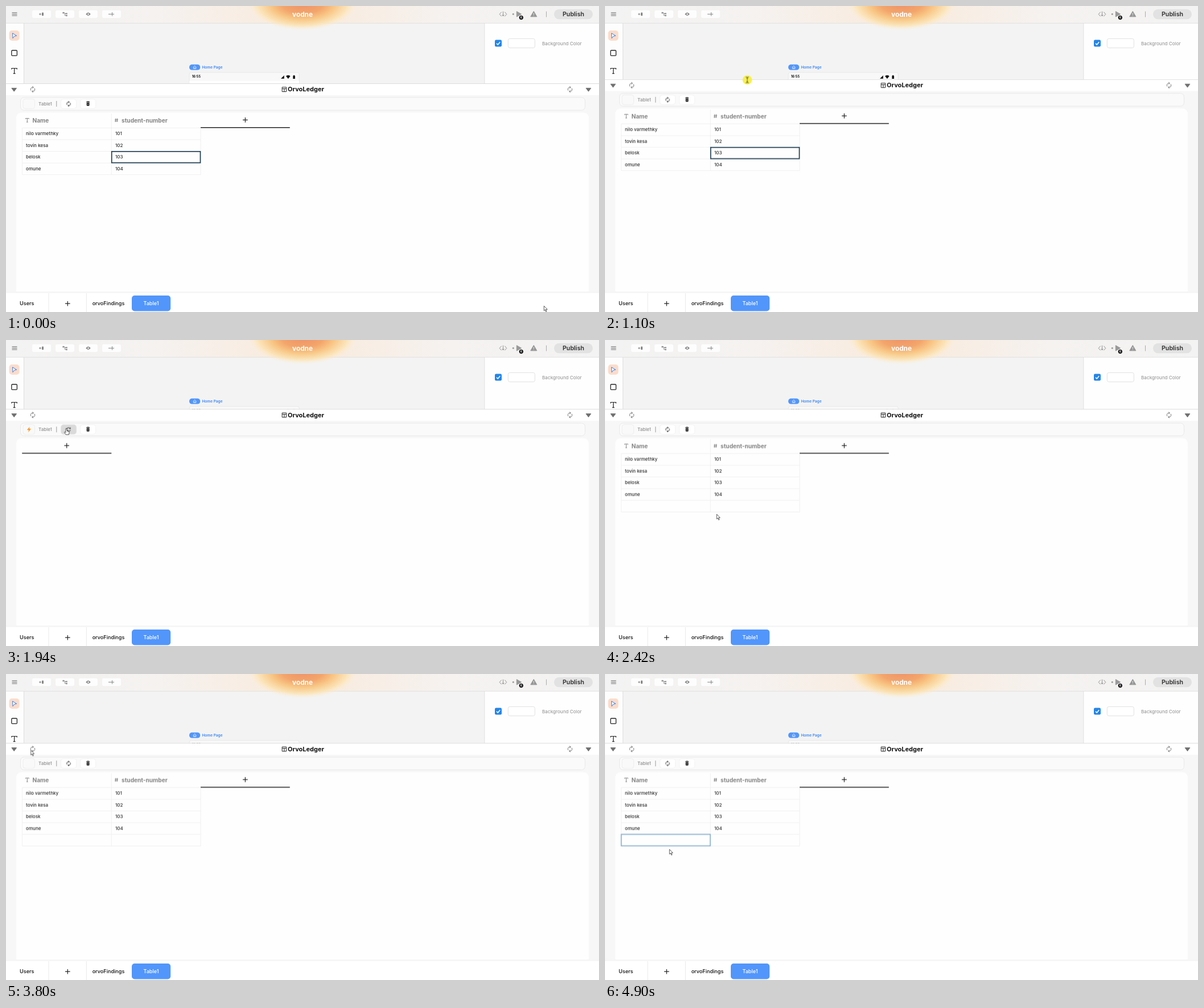
An HTML page for the animation above (4970 ms loop, 1042 px wide and 538 px high).

```html
<!DOCTYPE html>
<html lang="en">
<head>
<meta charset="utf-8">
<title>Sheet reload</title>
<style>
html, body { margin: 0; width: 100%; height: 100%; overflow: hidden; background: #f7f7f7; }
svg { display: block; width: 100%; height: 100%; }
text { font-family: Inter, "Open Sans", sans-serif; font-size: 8.1px; font-weight: 500; fill: #2e2e2e; }
.mid { text-anchor: middle; }
.bold { font-weight: 700; }
.grey { fill: #8d8d8d; }
.head { font-size: 10.1px; font-weight: 700; fill: #858585; }
.tab { font-size: 9.1px; fill: #111; }
.line { fill: none; stroke-width: 1; stroke-linecap: round; stroke-linejoin: round; }
.rule { fill: none; stroke: #ececec; stroke-width: .8; }

/* every track shares one 4970 ms loop */
.anim { animation: 4970ms step-end infinite; }
.panel { animation-name: lift; }
.data { animation-name: data; }
.empty { animation-name: empty; }
.pick { animation-name: pick; }
.extra { animation-name: extra; }
.hotnum { animation-name: hotnum; }
.hotname { animation-name: hotname; }
.cell { animation-name: cell; }
.press { animation-name: press; }
.spin { animation-name: spin; animation-timing-function: linear; }
.cursor { animation-name: move; animation-timing-function: linear; }
.arrow { animation-name: arrow; }
.resize { animation-name: resize; }
.hand { animation-name: hand; }
.ring { animation-name: ring; }

@keyframes lift {
  0% { transform: translateY(0); }
  22.1% { transform: translateY(-7.2px); }
  23.5%, 100% { transform: translateY(-14.7px); }
}
@keyframes data {
  0% { opacity: 1; } 37.6% { opacity: 0; } 48.6% { opacity: 1; }
  83% { opacity: 0; } 87.2%, 100% { opacity: 1; }
}
@keyframes empty {
  0% { opacity: 0; } 37.6% { opacity: 1; } 48.6% { opacity: 0; }
  83% { opacity: 1; } 87.2%, 100% { opacity: 0; }
}
@keyframes pick { 0% { opacity: 1; } 37.6%, 100% { opacity: 0; } }
@keyframes extra { 0% { opacity: 0; } 48.6%, 100% { opacity: 1; } }
@keyframes hotnum { 0% { opacity: 0; } 12.2% { opacity: 1; } 13.6%, 100% { opacity: 0; } }
@keyframes hotname { 0% { opacity: 0; } 30.5% { opacity: 1; } 34.7%, 100% { opacity: 0; } }
@keyframes cell {
  0% { opacity: 0; }
  8% { opacity: 1; transform: translate(28.6px, 276.1px); }
  9.4% { opacity: 1; transform: translate(28.6px, 235px); }
  10.8% { opacity: 0; }
  63.5% { opacity: 1; transform: translate(185.3px, 296.6px); }
  65.1% { opacity: 1; transform: translate(28.6px, 276.1px); }
  67.9% { opacity: 1; transform: translate(28.6px, 235px); }
  69.3% { opacity: 0; }
  88.6% { opacity: 1; transform: translate(28.6px, 235px); }
  90% { opacity: 1; transform: translate(28.6px, 255.5px); }
  91.4% { opacity: 1; transform: translate(28.6px, 276.1px); }
  92.8%, 100% { opacity: 1; transform: translate(28.6px, 296.6px); }
}
@keyframes press {
  0% { opacity: 0; } 36.2% { opacity: 1; } 41.8% { opacity: 0; }
  81.6% { opacity: 1; } 85.8%, 100% { opacity: 0; }
}
@keyframes spin {
  0%, 37.6% { transform: rotate(0deg); }
  48.6%, 83% { transform: rotate(360deg); }
  87.2%, 100% { transform: rotate(540deg); }
}
@keyframes move {
  0%, 1.3% { transform: translate(945px, 527px); }
  4% { transform: translate(700px, 480px); }
  6.6% { transform: translate(330px, 380px); }
  8% { transform: translate(185px, 305px); }
  9.4% { transform: translate(165px, 255px); }
  10.9% { transform: translate(190px, 204px); }
  12.2%, 13.4% { transform: translate(219.5px, 185px); }
  13.7% { transform: translate(232px, 166px); }
  15.1% { transform: translate(240px, 150px); }
  16.5% { transform: translate(246px, 142px); }
  18% { transform: translate(249px, 139px); }
  20.7% { transform: translate(250px, 137px); }
  22.1%, 26.2% { transform: translate(250px, 130px); }
  27.8% { transform: translate(222px, 148px); }
  29.2% { transform: translate(190px, 163px); }
  30.6% { transform: translate(165px, 175px); }
  32% { transform: translate(150px, 178px); }
  33.4% { transform: translate(135px, 173px); }
  34.8% { transform: translate(118px, 163px); }
  36.2%, 40.4% { transform: translate(106px, 155px); }
  41.8% { transform: translate(115px, 180px); }
  44.3% { transform: translate(160px, 260px); }
  47.2% { transform: translate(196px, 305px); }
  48.6%, 59.2% { transform: translate(196px, 306px); }
  59.4%, 60.6% { transform: translate(197px, 306px); }
  60.8%, 62.2% { transform: translate(196px, 306px); }
  63.6% { transform: translate(188px, 300px); }
  65.2% { transform: translate(150px, 275px); }
  66.6%, 67.8% { transform: translate(91px, 236px); }
  69.4% { transform: translate(50px, 180px); }
  70.8% { transform: translate(25px, 145px); }
  72.2% { transform: translate(10px, 131px); }
  73.6% { transform: translate(6px, 130px); }
  75% { transform: translate(26px, 130px); }
  77.9% { transform: translate(60px, 137px); }
  80.5% { transform: translate(100px, 152px); }
  81.7%, 84.5% { transform: translate(106.5px, 157.5px); }
  85.9% { transform: translate(110px, 175px); }
  87.3% { transform: translate(114px, 205px); }
  90.1% { transform: translate(118px, 260px); }
  93%, 95.6% { transform: translate(120px, 283px); }
  97.2% { transform: translate(117px, 297px); }
  98.5%, 100% { transform: translate(113px, 308px); }
}
@keyframes arrow {
  0% { opacity: 1; } 16.5% { opacity: 0; } 26.3% { opacity: 1; } 36.2% { opacity: 0; }
  41.8% { opacity: 1; } 81.6% { opacity: 0; } 85.8%, 100% { opacity: 1; }
}
@keyframes resize { 0% { opacity: 0; } 16.5% { opacity: 1; } 26.3%, 100% { opacity: 0; } }
@keyframes hand {
  0% { opacity: 0; } 36.2% { opacity: 1; } 41.8% { opacity: 0; }
  81.6% { opacity: 1; } 85.8%, 100% { opacity: 0; }
}
@keyframes ring { 0% { opacity: 0; } 19.3% { opacity: 1; } 26.3%, 100% { opacity: 0; } }
</style>
</head>
<body>
<svg viewBox="0 0 1042 538" preserveAspectRatio="none">
  <defs>
    <radialGradient id="sun">
      <stop offset="0" stop-color="#ee9069"/>
      <stop offset=".38" stop-color="#f3a56b"/>
      <stop offset=".6" stop-color="#f8c887"/>
      <stop offset=".82" stop-color="#fbe3b4" stop-opacity=".9"/>
      <stop offset="1" stop-color="#fcefd4" stop-opacity="0"/>
    </radialGradient>
    <linearGradient id="bar">
      <stop offset="0" stop-color="#f3f3f3"/>
      <stop offset=".25" stop-color="#f5f2f0"/>
      <stop offset=".5" stop-color="#faeadb"/>
      <stop offset=".75" stop-color="#f5f2f0"/>
      <stop offset="1" stop-color="#f3f3f3"/>
    </linearGradient>
    <g id="sync" class="line">
      <path d="M-3.4 1.6A3.8 3.8 0 0 1 1-3.7M3.4-1.6A3.8 3.8 0 0 1-1 3.7"/>
      <path d="M-.4-5.2L1.3-3.6L-.4-2M.4 5.2L-1.3 3.6L.4 2"/>
    </g>
    <path id="plus" d="M-4.3 0H4.3M0-4.3V4.3" fill="none" stroke="#222" stroke-width="1.2"/>
    <path id="drop" d="M-4.3-2.6H4.3L0 3.2Z" fill="#707070" stroke="#707070" stroke-linejoin="round"/>
    <path id="menu" d="M-4.5-2.6H4.5M-4.5 0H4.5M-4.5 2.6H4.5" fill="none" stroke-width="1.2"/>
    <path id="tee" d="M-3-2V-3.2H3V-2M0-3.2V3.3M-1.4 3.3H1.4" fill="none"/>
    <path id="hash" d="M-1-3.3L-1.8 3.3M1.8-3.3L1 3.3M-2.8-1.2H3M-3 1.2H2.8" fill="none"/>
  </defs>

  <!-- editor behind the sheet -->
  <rect x="31" y="30" width="810" height="120" fill="#f3f3f3"/>
  <rect y="30" width="31" height="120" fill="#fdfdfd"/>
  <rect x="841" y="30" width="201" height="120" fill="#fefefe"/>
  <path d="M31.5 30V150M840.8 30V150" stroke="#dfdfdf" fill="none"/>
  <rect width="1042" height="30" fill="url(#bar)"/>
  <path d="M0 30.3H1042" stroke="#dedede" stroke-width=".8"/>
  <ellipse cx="521" cy="-5" rx="96" ry="48" fill="url(#sun)"/>
  <text class="mid bold" x="521" y="19" style="font-size:11.8px;fill:#fff">vodne</text>

  <use href="#menu" x="15" y="14.3" stroke="#858585"/>
  <g fill="#fdfdfd">
    <rect x="46" y="7.5" width="33" height="13.5" rx="3"/>
    <rect x="87" y="7.5" width="33" height="13.5" rx="3"/>
    <rect x="128" y="7.5" width="33" height="13.5" rx="3"/>
    <rect x="169" y="7.5" width="33" height="13.5" rx="3"/>
  </g>
  <g fill="#858585" stroke="#858585">
    <path d="M58 14.3H62M60 12.3V16.3" fill="none"/>
    <rect x="63" y="11.5" width="3" height="5.5" rx=".6" stroke="none"/>
    <path d="M100.5 12H103.5V16.8H106M103.5 13.5H106" fill="none" stroke-width=".9"/>
    <path d="M99.5 10.8h2.4v2.4h-2.4zM105.3 12.2h2.4v2.2h-2.4zM105.3 15.8h2.4v2.2h-2.4z" stroke="none"/>
    <path d="M140.3 14.3Q144.5 8.8 148.7 14.3Q144.5 19.8 140.3 14.3Z" stroke="none"/>
    <circle cx="144.5" cy="14.3" r="1.2" fill="#fff" stroke="none"/>
    <path d="M180 14.3H190M186.5 11V17.6" fill="none"/>
  </g>

  <g class="line" stroke="#8f8f8f">
    <path d="M870.5 10.8L867.2 14.4L870.5 18M876.5 10.8L879.8 14.4L876.5 18M873.5 10V17.5M871.8 15.8L873.5 17.7L875.2 15.8"/>
  </g>
  <circle cx="891.3" cy="14.3" r="1.5" fill="#999"/>
  <path d="M897.3 9.5L905.6 14.3L897.3 19Z" fill="#999" stroke="#999" stroke-linejoin="round"/>
  <circle cx="905.3" cy="20.3" r="3.6" fill="#111"/>
  <text class="mid bold" x="905.3" y="22" style="font-size:4.8px;fill:#fff">6</text>
  <path d="M927.3 9.3L932.8 18.8H921.8Z" fill="#969696" stroke="#969696" stroke-linejoin="round"/>
  <path d="M927.3 12.4V15.5M927.3 16.7V17.6" stroke="#f3f3f3"/>
  <path d="M949.5 9.5V19.5" stroke="#aaa"/>
  <rect x="963" y="5.8" width="68" height="17.4" rx="8.7" fill="#e2e2e2"/>
  <text class="mid" x="997" y="18" style="font-size:10.7px;font-weight:600">Publish</text>

  <rect x="5.5" y="43" width="18" height="18" rx="5" fill="#fbdccb"/>
  <path d="M11.5 47.8L18.6 52.3L14.6 53.2L11.9 56.8Z" fill="#fff" stroke="#3b7fe0" stroke-linejoin="round"/>
  <rect x="9.8" y="78" width="9.6" height="9.4" rx="1.5" fill="none" stroke="#222" stroke-width="1.3"/>
  <path d="M10 111.5V109.5H19.2V111.5M14.6 109.5V118.6M12.7 118.6H16.5" fill="none" stroke="#222" stroke-width="1.2"/>

  <rect x="859" y="59.5" width="12" height="12" rx="2.2" fill="#2385e8"/>
  <path d="M862 65.7L864.2 68L868.2 63.2" fill="none" stroke="#fff" stroke-width="1.5"/>
  <rect x="882.4" y="57.4" width="47" height="16.2" rx="3" fill="#fff" stroke="#dedede" stroke-width=".9"/>
  <text class="grey" x="942" y="68.5" style="font-size:8.2px;font-weight:400">Background Color</text>

  <rect x="322" y="102.8" width="19.3" height="9.8" rx="4.9" fill="#5296fb"/>
  <path d="M329.4 110V107.3L331.6 105.2L333.8 107.3V110ZM331.6 108.2V110" fill="none" stroke="#fff" stroke-width=".8"/>
  <text class="bold" x="344.5" y="110" style="font-size:6.5px;fill:#4b8ff4">Home Page</text>
  <path d="M322 150V120Q322 116.7 325.3 116.7H512Q515.3 116.7 515.3 120V150Z" fill="#f8f8f8" stroke="#e4e4e4" stroke-width=".8"/>
  <rect x="322.4" y="131.5" width="192.5" height="10" fill="#fff"/>
  <text class="bold" x="326.8" y="126.3" style="font-size:5.7px;fill:#111">16:55</text>
  <path d="M483 127.7H488.8V121.9ZM492 123.2Q495.8 120.3 499.6 123.2L495.8 128ZM504.3 122.6H505.2V121.8H507V122.6H507.9V128H504.3Z" fill="#111"/>

  <!-- sheet panel -->
  <g class="panel anim">
    <rect y="136.5" width="1042" height="420" fill="#f7f7f7"/>
    <rect y="136.5" width="1042" height="20.2" fill="#fff"/>
    <path d="M0 136.5H1042" stroke="#dcdcdc"/>
    <use href="#drop" x="14.2" y="147"/>
    <use href="#drop" x="1023.5" y="147"/>
    <use href="#sync" x="47" y="146.6" stroke="#777"/>
    <use href="#sync" x="991" y="146.6" stroke="#777"/>
    <path d="M485.2 142.8H492.6V150.6H485.2ZM485.2 145.4H492.6M488.9 145.4V150.6" fill="none" stroke="#222"/>
    <text class="bold" x="495" y="150.4" style="font-size:11px;fill:#111">OrvoLedger</text>

    <rect x="25.5" y="160.8" width="992" height="22.4" rx="6" fill="#fafafa" stroke="#e7e7e7" stroke-width=".9"/>
    <rect x="30" y="163.3" width="20.5" height="17.4" rx="4" fill="#f9f9f9" stroke="#ebebeb" stroke-width=".8"/>
    <path class="empty anim" d="M41.6 167.2L36.8 172.9H40L39 177L44.2 170.8H40.9Z" fill="#f29a2e"/>
    <text class="grey" x="57" y="174.8" style="font-size:8px">Table1</text>
    <path d="M88.8 167V177" stroke="#999"/>
    <rect x="96.5" y="163.6" width="27.2" height="16.8" rx="4.5" fill="#fff" stroke="#eee" stroke-width=".7"/>
    <rect class="press anim" x="96.5" y="163.6" width="27.2" height="16.8" rx="4.5" fill="#dadada"/>
    <g transform="translate(110 172) scale(.88)"><g class="spin anim"><use href="#sync" stroke="#222" style="stroke-width:1.4"/></g></g>
    <rect x="130.5" y="163.6" width="27.2" height="16.8" rx="4.5" fill="#fff" stroke="#eee" stroke-width=".7"/>
    <path d="M141.2 168.6H147M142.9 168.1H145.3" stroke="#111" stroke-width="1.1"/>
    <path d="M141.7 169.9H146.5V174.6Q146.5 175.6 145.5 175.6H142.7Q141.7 175.6 141.7 174.6Z" fill="#111"/>
    <path d="M143 171.4L145.2 173.8M145.2 171.4L143 173.8" stroke="#fff" stroke-width=".6"/>

    <path d="M18 560V198Q18 187.3 28.7 187.3H1013.3Q1024 187.3 1024 198V560Z" fill="#fefefe"/>

    <g class="empty anim">
      <use href="#plus" x="106.7" y="200.4"/>
      <path d="M28.2 213.7H185.3" stroke="#222" stroke-width="1.6"/>
    </g>

    <g class="data anim">
      <use href="#tee" x="37.3" y="200.8" stroke="#858585"/>
      <text class="head" x="46.5" y="204.7">Name</text>
      <use href="#hash" x="194" y="200.8" stroke="#858585"/>
      <text class="head" x="203" y="204.7">student-number</text>
      <g class="hotname anim">
        <use href="#tee" x="37.3" y="200.8" stroke="#111"/>
        <text class="head" x="46.5" y="204.7" style="fill:#111">Name</text>
        <use href="#menu" x="171.5" y="200.8" stroke="#efa02f"/>
      </g>
      <g class="hotnum anim">
        <use href="#hash" x="194" y="200.8" stroke="#111"/>
        <text class="head" x="203" y="204.7" style="fill:#111">student-number</text>
        <use href="#menu" x="328.3" y="200.8" stroke="#efa02f"/>
      </g>
      <use href="#plus" x="420.4" y="200.4"/>
      <path d="M342 213.7H498.8" stroke="#222" stroke-width="1.6"/>

      <path class="rule" d="M28.6 214.4H342M28.6 235H342M28.6 255.5H342M28.6 276.1H342M28.6 296.6H342M28.6 214.4V296.6M185.3 189V296.6M342 214.4V296.6"/>
      <path class="rule extra anim" d="M28.6 296.6V317.2H342V296.6M185.3 296.6V317.2"/>
      <text x="35" y="227.2">nilo varmethky</text><text x="192" y="227.2">101</text>
      <text x="35" y="247.8">tovin kesa</text><text x="192" y="247.8">102</text>
      <text x="35" y="268.3">belosk</text><text x="192" y="268.3">103</text>
      <text x="35" y="288.9">omune</text><text x="192" y="288.9">104</text>
      <rect class="pick anim" x="185.7" y="255.8" width="155.8" height="19.8" fill="none" stroke="#1f3c52" stroke-width="1.7"/>
      <rect class="cell anim" width="156.4" height="20.2" fill="none" stroke="#669bc2" stroke-width="1.3"/>
    </g>
  </g>

  <!-- sheet tabs -->
  <rect y="502" width="1042" height="3" fill="#f5f5f5"/>
  <rect y="504.6" width="1042" height="34" fill="#fff"/>
  <path d="M75 505V538M141.4 505V538" stroke="#e9e9e9"/>
  <text class="tab mid" x="36.8" y="526">Users</text>
  <use href="#plus" x="108.3" y="523.2"/>
  <text class="tab mid" x="180" y="526">orvoFindings</text>
  <rect x="221" y="509" width="68.2" height="27.4" rx="5" fill="#5296fb"/>
  <text class="tab mid" x="255" y="526" style="fill:#fff">Table1</text>

  <g class="cursor anim">
    <circle class="ring anim" r="8.3" fill="#f7ef3c" fill-opacity=".9"/>
    <path class="resize anim" d="M-2.8-5H2.8M-2.8 5H2.8M0-4V4M-1.6-2.4L0-4L1.6-2.4M-1.6 2.4L0 4L1.6 2.4" fill="none" stroke="#555" stroke-width=".9"/>
    <path class="arrow anim" d="M.3.3V8.8L2.3 7L3.7 10.4L5 9.8L3.6 6.6L6.2 6.4Z" fill="#fff" stroke="#333" stroke-width=".8" stroke-linejoin="round"/>
    <path class="hand anim" d="M-1 .8Q0-.6 1 .8V4.2L4.4 5Q5.4 5.4 5.2 6.8L4.4 11.4H-.8L-3.4 7.6Q-3.6 6.4-2.4 6.6L-1 7.8ZM2.2 4.8V6.4M3.6 5V6.6" fill="#fff" stroke="#333" stroke-width=".8" stroke-linejoin="round"/>
  </g>
</svg>
</body>
</html>
```
